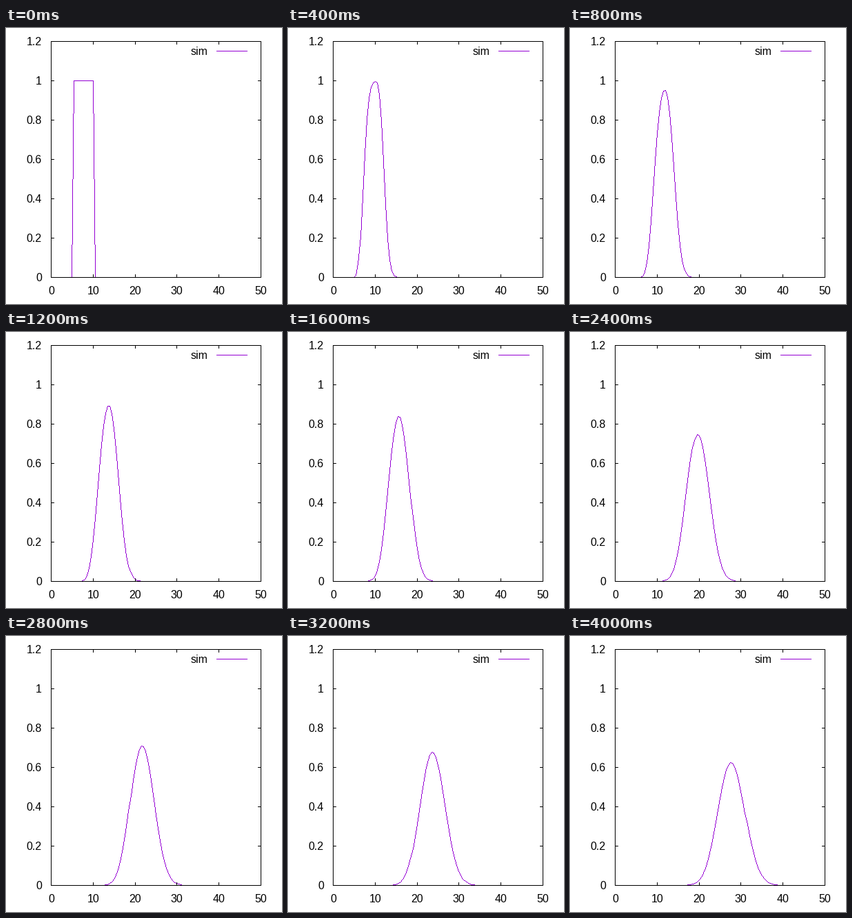
These frames come from a looping animation (400x400 px, 4.1 s). A matplotlib script:

```python
import numpy as np
import matplotlib.pyplot as plt
from matplotlib.animation import FuncAnimation
from matplotlib.collections import PolyCollection
from matplotlib.patches import Rectangle

SIZE = 400
LEFT, RIGHT, TOP, BOTTOM = 65, 369, 19, 361
X_MAX, Y_MAX = 50, 1.2
TICK = 5
PURPLE = "#9400D3"

FRAMES = 41
STEPS_PER_FRAME = 5
COURANT = 0.2
GRID = np.linspace(0, X_MAX, 101)

plt.rcParams["font.family"] = "Liberation Sans"
fig = plt.figure(figsize=(SIZE / 72, SIZE / 72), dpi=72, facecolor="white")
ax = fig.add_axes([0, 0, 1, 1])
ax.set_xlim(0, SIZE)
ax.set_ylim(SIZE, 0)
ax.axis("off")


def to_px(x, y):
    px = LEFT + x * (RIGHT - LEFT) / X_MAX
    py = BOTTOM - y * (BOTTOM - TOP) / Y_MAX
    return np.floor(px + 0.5).astype(int), np.floor(py + 0.5).astype(int)


def bar(x0, y0, x1, y1, color="black", z=3):
    """Fill the pixels from (x0, y0) to (x1, y1), both included."""
    ax.add_patch(Rectangle((x0, y0), x1 - x0 + 1, y1 - y0 + 1, color=color,
                           linewidth=0, antialiased=False, zorder=z))


def label(x, y, text, align):
    ax.text(x, y, text, fontsize=16, ha=align, va="baseline", color="black")


def draw_axes():
    for y in (TOP, BOTTOM):
        bar(LEFT, y, RIGHT, y)
    for x in (LEFT, RIGHT):
        bar(x, TOP, x, BOTTOM)
    for value in range(0, X_MAX + 1, 10):
        x, _ = to_px(np.float64(value), 0.0 * np.ones(()))
        bar(x, TOP, x, TOP + TICK - 1)
        bar(x, BOTTOM - TICK + 1, x, BOTTOM)
        label(x + 0.5, 386, str(value), "center")
    for k in range(7):
        value = k / 5
        _, y = to_px(np.zeros(()), np.float64(value))
        bar(LEFT, y, LEFT + TICK - 1, y)
        bar(RIGHT - TICK + 1, y, RIGHT, y)
        label(52, y + 6, f"{value:g}", "right")
    label(292, 39, "sim", "right")
    bar(305, 33, 349, 33, PURPLE)


def simulate():
    """Upwind advection of a square pulse, one profile per frame."""
    u = ((GRID > 5.25) & (GRID < 10.25)).astype(float)
    profiles = [u.copy()]
    for _ in range(FRAMES - 1):
        for _ in range(STEPS_PER_FRAME):
            u[1:] -= COURANT * (u[1:] - u[:-1])
        profiles.append(u.copy())
    return profiles


def line_pixels(px, py):
    """Pixels of an unsmoothed one-pixel polyline."""
    cells = set()
    for x0, y0, x1, y1 in zip(px[:-1], py[:-1], px[1:], py[1:]):
        n = max(abs(x1 - x0), abs(y1 - y0))
        xs = np.floor(np.linspace(x0, x1, n + 1) + 0.5).astype(int)
        ys = np.floor(np.linspace(y0, y1, n + 1) + 0.5).astype(int)
        cells.update(zip(xs.tolist(), ys.tolist()))
    return np.array(sorted(cells))


draw_axes()
profiles = simulate()
unit = np.array([[0, 0], [1, 0], [1, 1], [0, 1]])
curve = PolyCollection([], facecolors=PURPLE, edgecolors="none", linewidths=0,
                       antialiaseds=False, zorder=2)
ax.add_collection(curve, autolim=False)


def update(frame):
    cells = line_pixels(*to_px(GRID, profiles[frame]))
    curve.set_verts(cells[:, None, :] + unit)
    return (curve,)


anim = FuncAnimation(fig, update, frames=FRAMES, interval=100, repeat=True,
                     repeat_delay=0, blit=False)
plt.show()
```
